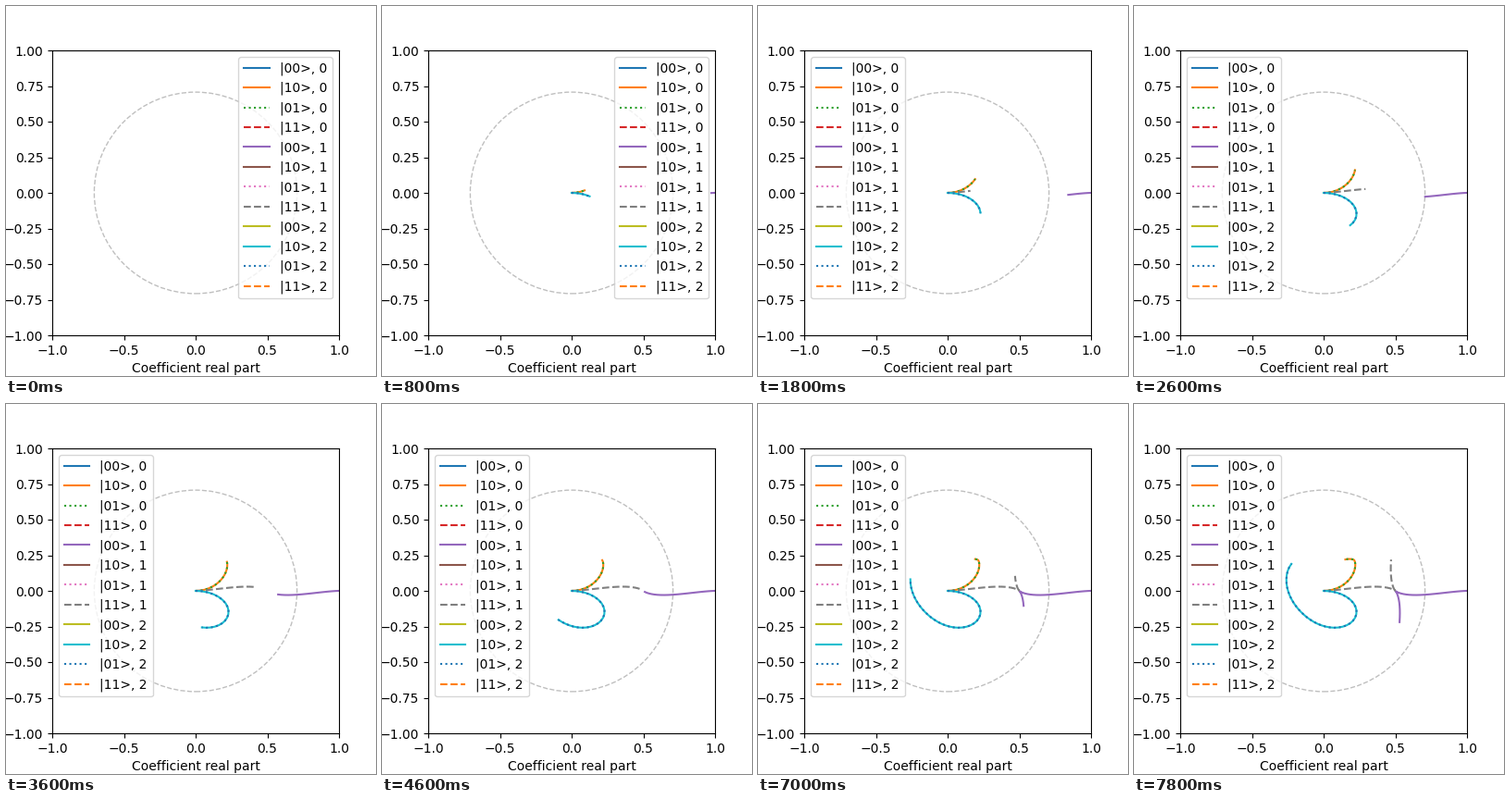
A matplotlib script for the animation above (8 s loop, 400 px wide and 400 px high).

```python
import numpy as np
import matplotlib.pyplot as plt
from matplotlib.animation import FuncAnimation
from matplotlib.patches import Circle

FRAMES = 40
STEP = 0.1266      # detuning times one time step
COUPLING = 0.99    # (4 g / detuning) squared
STATES = [("00", "-"), ("10", "-"), ("01", ":"), ("11", "--")]

plt.rcParams["font.family"] = "DejaVu Sans"


def evolve(count):
    """Two-qubit gate amplitudes, starting from |00> with one phonon."""
    t = STEP * np.arange(count)
    alpha = np.sqrt(COUPLING) * np.sin(t / 2)
    x = alpha ** 2
    phase = COUPLING / 4 * (t - np.sin(t))
    common = np.exp(-x / 2 - 1j * phase)
    diff = common * (1 - x)
    down = alpha / 2 * common * np.exp(0.5j * t)
    up = alpha / np.sqrt(2) * (1 - x / 2) * common * np.exp(-0.5j * t)
    return {
        ("00", 1): (1 + diff) / 2,
        ("11", 1): (1 - diff) / 2,
        ("10", 0): down,
        ("01", 0): down,
        ("10", 2): up,
        ("01", 2): up,
    }


paths = evolve(FRAMES)

fig, ax = plt.subplots(figsize=(4, 4), dpi=100)
ax.set_xlim(-1, 1)
ax.set_ylim(-1, 1)
ax.set_xlabel("Coefficient real part")
ax.add_patch(Circle((0, 0), 1 / np.sqrt(2), fill=False, color="gray",
                    alpha=0.5, linestyle="--", linewidth=1))

lines = {}
for n in range(3):
    for state, style in STATES:
        lines[state, n], = ax.plot([], [], style, label=f"|{state}>, {n}")
legend = ax.legend(loc="upper right")


def draw(frame):
    for key, z in paths.items():
        lines[key].set_data(z.real[:frame], z.imag[:frame])
    legend.set_loc("upper right" if frame < 5 else "upper left")
    return list(lines.values())


def reset():
    return draw(0)


anim = FuncAnimation(fig, draw, frames=FRAMES, init_func=reset,
                     interval=200, repeat=True, blit=False)
plt.show()
```
